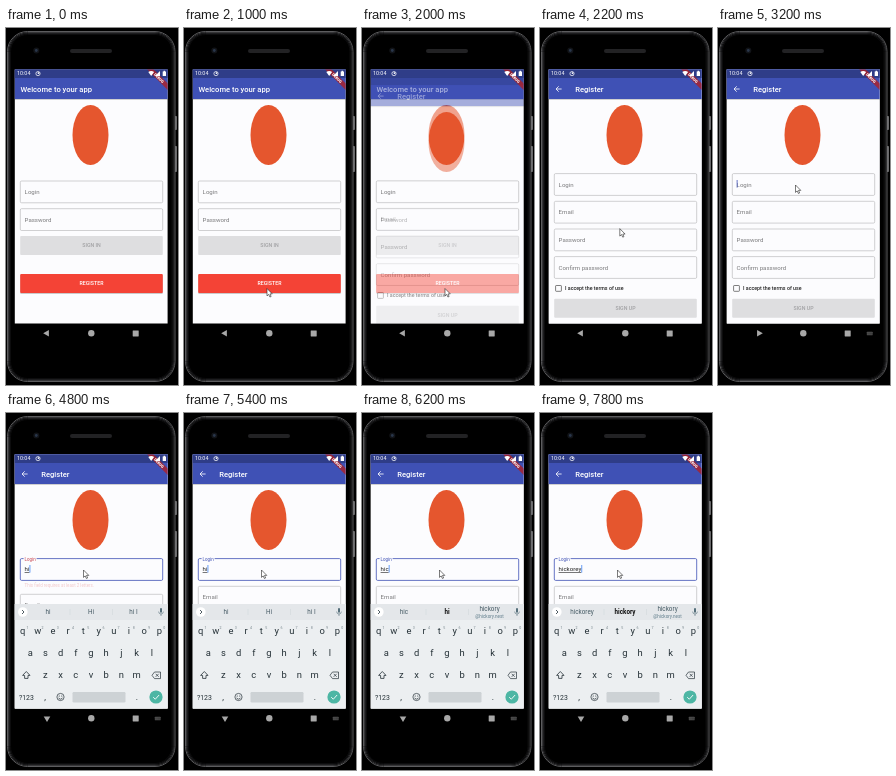
Write an HTML page that moves like this. It is 172x357 px and loops after 8000 ms.

```html
<!DOCTYPE html>
<html lang="en">
<meta charset="utf-8">
<title>Register form</title>
<style>
  html, body { margin: 0; height: 100%; overflow: hidden; background: #000; }
  svg { display: block; width: 100vw; height: 100vh; font-family: Roboto, sans-serif; }
</style>
<body>
<script>
const text = (x, y, size, fill, str, more = '') =>
  `<text x="${x}" y="${y}" font-size="${size}" fill="${fill}" ${more}>${str}</text>`;
const rect = (x, y, w, h, fill, more = '') =>
  `<rect x="${x}" y="${y}" width="${w}" height="${h}" fill="${fill}" ${more}/>`;
const circle = (x, y, r, fill, more = '') =>
  `<circle cx="${x}" cy="${y}" r="${r}" fill="${fill}" ${more}/>`;
const line = (d, color, width = .7, more = '') =>
  `<path d="${d}" fill="none" stroke="${color}" stroke-width="${width}" ${more}/>`;
const group = (id, body, more = '') => `<g id="${id}" ${more}>${body}</g>`;
const mid = 'text-anchor="middle"', medium = 'font-weight="500"';

const outline = (y, more = '') =>
  rect(14.3, y, 142.4, 21.8, 'none', `rx="1.3" stroke="#a3a3a5" stroke-width=".5" ${more}`);
const field = (y, label) => outline(y) + text(18.6, y + 13, 6.1, '#7a7a7c', label);
const button = (y, label, fill, color) => rect(14.2, y, 142.6, 19, fill, 'rx="1"') +
  text(85.5, y + 11.4, 5.25, color, label, `${mid} ${medium}`);

const page = (title, x, body) => rect(8, 41, 154, 255, '#fcfcfe') +
  rect(8, 71, 154, 1, '#000', 'opacity=".18"') +
  rect(8, 41, 154, 30, '#3f51b5') + rect(8, 41, 154, 9, '#2f3d88') +
  text(x, 63.6, 7.6, '#fff', title, medium) +
  '<ellipse cx="84.5" cy="107" rx="18" ry="30" fill="#e5562e"/>' + body;

const home = page('Welcome to your app', 14.5,
  field(153, 'Login') + field(180.7, 'Password') +
  button(208, 'SIGN IN', '#dedee0', '#a2a2a4') +
  rect(14.2, 247, 142.6, 19, '#000', 'rx="1" opacity=".2"') +
  button(246, 'REGISTER', '#f44336', '#fff') +
  rect(14.2, 246, 142.6, 19, '#fff', 'id="ripple" rx="1"'));

const form = page('Register', 35.2,
  line('M21.6 61H16.2M18.7 58.3L16 61L18.7 63.7', '#fff', .8) +
  outline(145.6, 'id="box"') +
  rect(17.6, 144.5, 13, 2.4, '#fcfcfe', 'id="notch"') +
  text(0, 0, 6, '', 'Login', 'id="label"') +
  text(18.6, 158, 6.1, '#222', '', 'id="typed" text-decoration="underline"') +
  rect(0, 152, .8, 7.6, '#4285f4', 'id="caret"') +
  text(18.6, 173.6, 4.48, '#d32f2f', 'This field requires at least 2 letters.', 'id="error"') +
  group('rest', field(173.3, 'Email') + field(201, 'Password') + field(228.6, 'Confirm password') +
    rect(15.6, 257.5, 5.8, 5.8, 'none', 'rx=".6" stroke="#555" stroke-width=".75"') +
    text(25, 262.3, 5.28, '#222', 'I accept the terms of use', medium) +
    button(270.8, 'SIGN UP', '#dedee0', '#a2a2a4')));

const keyRow = (keys, x, y, digits) => [...keys].map((key, i) =>
  text(x + i * 15.2, y, 9.4, '#263238', key, mid) +
  (digits ? text(x + 4.8 + i * 15.2, y - 4.8, 3.6, '#78868d', (i + 1) % 10, mid) : '')).join('');

const keyboard = rect(8, 191, 154, 105, '#eceff1') + rect(8, 191, 154, 16, '#e4e7ea') +
  circle(16.8, 199, 4.8, '#fff') + line('M16 197L18 199L16 201', '#3c4a52', .9) +
  line('M64 196V202M106.5 196V202', '#cfd5d8', .5) +
  group('words', [42, 85, 127.5].map(x => text(x, 201.2, 6.3, '#455a64', '', mid)).join('')) +
  text(127.5, 204.6, 4.6, '#607d8b', '@hickory.nest', `id="handle" ${mid}`) +
  rect(154, 195, 2, 4.8, '#546e7a', 'rx="1"') +
  line('M152.6 198.6Q152.8 201 155 201Q157.2 201 157.4 198.6M155 201V203', '#546e7a', .6) +
  keyRow('qwertyuiop', 16.6, 220.9, true) + keyRow('asdfghjkl', 24.2, 242.8) +
  keyRow('zxcvbnm', 39.4, 264.8) +
  line('M20.3 258.5L24 262.4H22V265.4H18.6V262.4H16.6Z', '#263238', .8) +
  line('M146 262.3L148.5 259H154.5V265.6H148.5ZM149.7 260.8L152.7 263.8M152.7 260.8L149.7 263.8', '#263238') +
  text(20.4, 286.5, 6.9, '#263238', '?123', mid) + text(39, 286.5, 8.6, '#263238', ',', mid) +
  circle(54.5, 284, 3.6, 'none', 'stroke="#263238" stroke-width=".7"') +
  circle(53.2, 283, .55, '#263238') + circle(55.8, 283, .55, '#263238') +
  line('M52.5 285Q54.5 287.4 56.5 285', '#263238') +
  rect(66.5, 279, 53, 10.4, '#cdd2d5', 'rx="1.2"') +
  text(131, 286.5, 8.6, '#263238', '.', mid) +
  circle(150, 284, 6.6, '#4db6a4') + line('M147.2 284.2L149.3 286.2L153.1 282', '#fff', .9);

// the system icons lie over the corner ribbon
const statusBar =
  `<g transform="translate(162 41) rotate(45)">${rect(-20, 10.5, 40, 4.5, '#b71c1c', 'opacity=".75"')}` +
  text(0, 14.1, 3.8, '#fff', 'DEBUG', `${mid} font-weight="900"`) + '</g>' +
  text(11, 47.4, 5.4, '#fff', '10:04') +
  circle(32, 45.6, 2.1, 'none', 'stroke="#fff" stroke-width=".7"') + circle(32.5, 45.1, .9, '#fff') +
  '<path d="M142.3 44Q145.2 41.8 148.1 44L145.2 48Z M154 43V48H149Z M156.7 43.4H157.6V42.8H159V43.4H160V48H156.7Z" fill="#fff"/>';

const nav = '<path id="back" d="M-3.8 0L1.9 -3.3V3.3Z" fill="#a8a8a8"/>' +
  circle(85.3, 305.3, 3.2, '#a8a8a8') + rect(126.7, 302.4, 6, 6, '#a8a8a8', 'rx=".4"') +
  group('switcher', rect(148.8, 303.8, 5.8, 3.4, '#505050', 'rx=".5"') +
    line('M149.6 305H154M149.6 306.1H154', '#000', .4, 'stroke-dasharray=".7 .5"'));

// rounded rim of the phone, fading inwards
const rim = ['#5c5c5e', '#353537', '#1c1c1e', '#0c0c0d'].map((color, i) =>
  rect(1.5 + i, 3.5 + i, 167.5 - 2 * i, 350 - 2 * i, '#000',
    `rx="${20 - i}" stroke="${color}" stroke-width="1"`)).join('');

document.body.innerHTML = `<svg viewBox="0 0 172 357" preserveAspectRatio="none">
  <clipPath id="screen">${rect(8.8, 41.4, 152.8, 254.2, '#000')}</clipPath>
  ${rect(0, 0, 172, 357, '#000')}
  ${rect(168.6, 88, 2.2, 14, '#858587', 'rx=".8"')}${rect(168.6, 118, 2.2, 26, '#858587', 'rx=".8"')}
  ${rim}
  ${circle(30.3, 22.5, 3, '#111317')}${circle(30.3, 22.5, 1.4, '#29364a')}
  ${rect(64, 21, 42, 4, '#222224', 'rx="2"')}
  <g clip-path="url(#screen)">${home}${group('form', form)}${group('keyboard', keyboard)}${statusBar}</g>
  ${nav}
  <path id="mouse" d="M0 0V7.4L1.7 5.9L2.9 8.5L4.1 8L3 5.4H5.3Z" fill="#fff" stroke="#222" stroke-width=".6"/>
</svg>`;

const $ = id => document.getElementById(id);
const set = (id, attrs) => { for (const k in attrs) $(id).setAttribute(k, attrs[k]); };
const clamp = v => Math.max(0, Math.min(1, v));
const span = (t, from, to) => clamp((t - from) / (to - from));
const out = p => 1 - (1 - p) ** 3;
const mix = (a, b, p) => a + (b - a) * p;
const at = (t, steps) => steps.filter(s => s[0] <= t).pop()[1];

const typing = [[0, ''], [4200, 'h'], [4800, 'hi'], [6000, 'hic'], [6400, 'hick'], [6600, 'hickor'], [6800, 'hickorey']];
const hints = [[0, ['', '', '']], [4200, ['h', 'H', 'he']], [4400, ['hi', 'Hi', 'hi I']],
  [6000, ['hic', 'hi', 'hickory']], [6400, ['hick', 'hi', 'hickory']],
  [6600, ['hickor', 'hickory', 'hickory']], [6800, ['hickorey', 'hickory', 'hickory']]];
const blinks = [[0, 0], [3000, 1], [3800, 0], [4000, 1], [5200, 0], [5400, 1], [7000, 0], [7200, 1], [7400, 0], [7800, 1]];

function draw(t) {
  // pointer: to the button, then up to the login field
  const go = out(span(t, 100, 1000)), up = out(span(t, 2000, 2800));
  const x = mix(mix(150, 83, go), 77.5, up), y = mix(mix(1, 260.5, go), 157, up);
  set('mouse', { transform: `translate(${x} ${y})`, opacity: +(t >= 200) });

  // page change
  set('ripple', { opacity: .16 * span(t, 1600, 1800) });
  const enter = span(t, 1835, 2135);
  set('form', { opacity: enter ** 1.3, transform: `translate(0 ${64 * (1 - enter) ** 2.76})` });

  // login field
  const float = span(t, 3200, 3400);
  const error = span(t, 4000, 4200) * (1 - .75 * span(t, 4600, 4800)) * (1 - span(t, 4800, 5000));
  const bad = t >= 4200 && t < 4800;
  set('box', {
    stroke: bad ? '#d32f2f' : float ? '#3f51b5' : '#a3a3a5',
    'stroke-width': mix(.5, .8, float)
  });
  set('notch', { opacity: float });
  set('label', {
    x: 18.6, y: mix(158.6, 147.6, float), 'font-size': mix(6.1, 4.48, float),
    fill: error ? '#c8434f' : float ? '#3f51b5' : '#7a7a7c'
  });
  $('typed').textContent = at(t, typing);
  set('caret', {
    x: 18.7 + $('typed').getComputedTextLength(), opacity: at(t, blinks),
    fill: float ? '#4285f4' : '#3f51b5'
  });
  set('error', { opacity: error });
  set('rest', { transform: `translate(0 ${8 * span(t, 4000, 4200) * (1 - span(t, 4800, 5000))})` });

  // keyboard and navigation bar
  set('keyboard', { transform: `translate(0 ${105 * (1 - out(span(t, 3200, 3600)))})`, opacity: +(t > 3200) });
  const words = at(t, hints);
  [...$('words').children].forEach((word, i) => {
    const bold = i === 1 && t >= 6000;
    word.textContent = words[i];
    word.setAttribute('font-weight', bold ? 700 : 400);
    word.setAttribute('fill', bold ? '#111' : '#455a64');
    word.setAttribute('y', i === 2 && t >= 6000 ? 197.6 : 201.2);
  });
  set('handle', { opacity: +(t >= 6000) });
  set('back', { transform: `translate(41 305.3) rotate(${-90 * span(t, 2900, 3350)})` });
  set('switcher', { opacity: +(t >= 3200) });
}

const start = performance.now();
function tick() {
  const t = (performance.now() - start) % 8000;
  draw(Math.floor(t / 200) * 200);
  requestAnimationFrame(tick);
}
tick();
</script>
</body>
</html>
```
